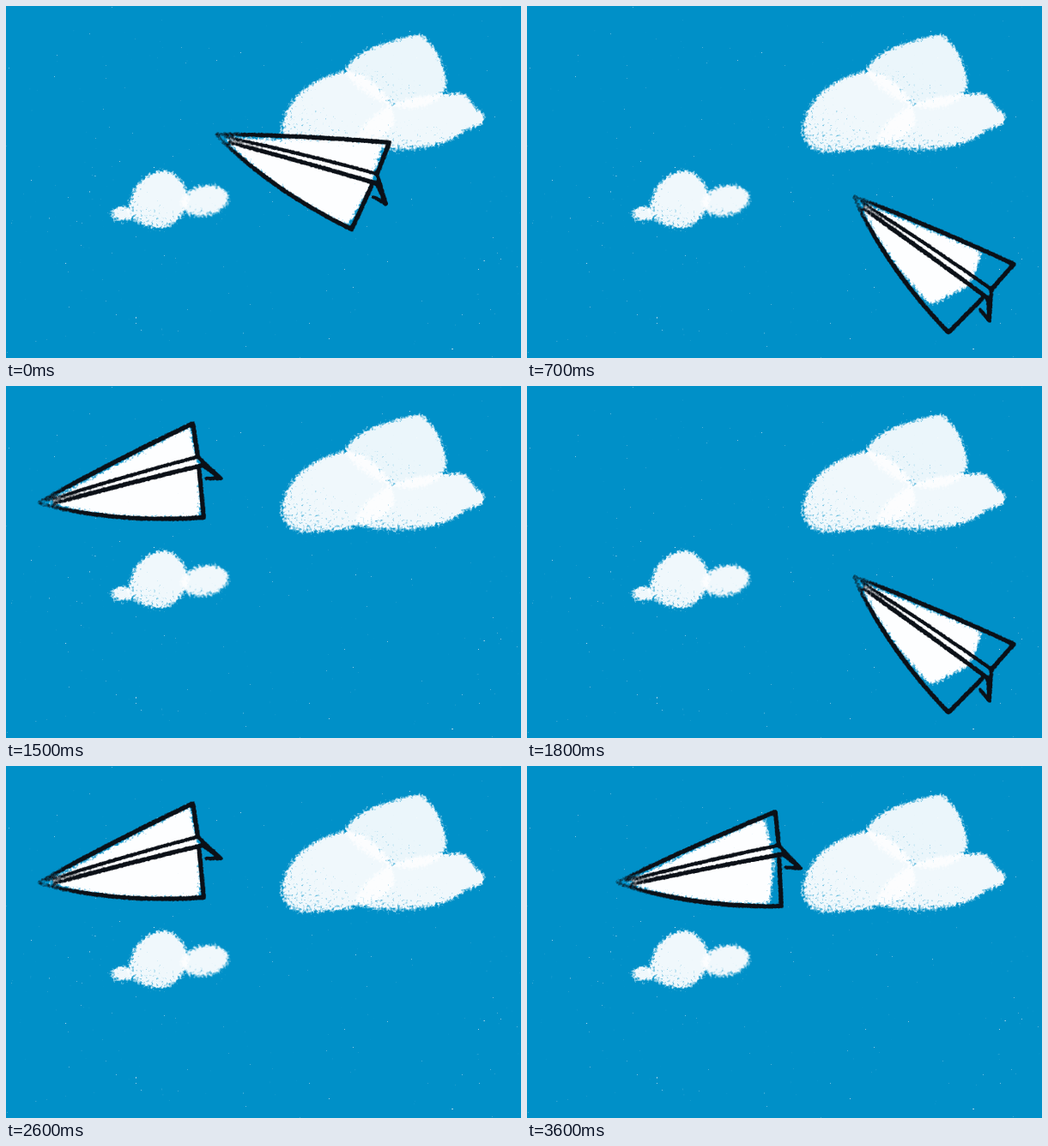
An HTML page that plays this animation: 600x411 px, repeating every 3700 ms.

```html
<!DOCTYPE html>
<html lang="en">
<head>
<meta charset="utf-8">
<title>Paper plane</title>
<style>
  html, body { margin: 0; width: 100%; height: 100%; overflow: hidden; background: #0090c8; }
  svg { display: block; width: 100%; height: 100%; }
  .lobe { fill: url(#thin); filter: url(#chalk); opacity: .95; }
  .back { opacity: .93; }
  .ink { fill: none; stroke: url(#fade); stroke-width: 4.8; stroke-linecap: round; stroke-linejoin: round; }
  .fine { stroke-width: 3.8; }
</style>
</head>
<body>
<svg viewBox="0 0 600 411">
  <defs>
    <!-- Grainy strokes: a blurred shape cut off by noise -->
    <filter id="chalk" filterUnits="userSpaceOnUse" x="0" y="0" width="600" height="411" color-interpolation-filters="sRGB">
      <feTurbulence type="fractalNoise" baseFrequency=".32" numOctaves="2" seed="4"/>
      <feColorMatrix values="0 0 0 0 0  0 0 0 0 0  0 0 0 0 0  1 0 0 0 0" result="grain"/>
      <feGaussianBlur in="SourceAlpha" stdDeviation="3.6"/>
      <feComposite in2="grain" operator="arithmetic" k2="2.6" k3="2.4" k4="-2" result="mask"/>
      <feFlood flood-color="#fdfeff"/>
      <feComposite in2="mask" operator="in"/>
    </filter>
    <filter id="crayon" filterUnits="userSpaceOnUse" x="0" y="0" width="600" height="411" color-interpolation-filters="sRGB">
      <feTurbulence type="fractalNoise" baseFrequency=".35" numOctaves="2" seed="9"/>
      <feColorMatrix values="0 0 0 0 0  0 0 0 0 0  0 0 0 0 0  1 0 0 0 0" result="grain"/>
      <feGaussianBlur in="SourceAlpha" stdDeviation="1"/>
      <feComposite in2="grain" operator="arithmetic" k2="2.4" k3="1.2" k4="-1.15" result="mask"/>
      <feFlood flood-color="#0b1017"/>
      <feComposite in2="mask" operator="in"/>
    </filter>
    <linearGradient id="thin" x1=".1" y1="1" x2=".5" y2=".3">
      <stop offset="0" stop-opacity=".66"/>
      <stop offset="1"/>
    </linearGradient>
    <linearGradient id="fade" gradientUnits="userSpaceOnUse" x1="-4" y1="0" x2="60" y2="0">
      <stop offset="0" stop-opacity=".35"/>
      <stop offset=".6" stop-opacity=".85"/>
      <stop offset="1"/>
    </linearGradient>
  </defs>

  <path class="lobe back" d="M392 76C405 52 445 40 484 33C500 48 513 68 513 95C505 125 440 140 392 76Z"/>
  <path class="lobe" d="M404 160C425 110 480 103 530 102C542 104 540 118 556 124C562 138 548 142 537 143C515 172 425 176 404 160Z"/>
  <path class="lobe" d="M320 143C324 105 365 80 398 76C435 84 455 115 452 140C430 168 370 174 338 171Q320 165 320 143Z"/>
  <ellipse class="lobe" cx="135" cy="243" rx="14" ry="9"/>
  <ellipse class="lobe" cx="231" cy="228" rx="29" ry="18" transform="rotate(-12 231 228)"/>
  <path class="lobe" d="M141 240C145 205 170 192 184 192C207 197 214 218 212 230C205 252 190 260 177 261C160 258 144 252 141 240Z"/>

  <g filter="url(#chalk)"><path id="paper" class="plane"/></g>
  <!-- The nose is the origin and the fold runs along x -->
  <g filter="url(#crayon)">
    <g class="plane">
      <path class="ink" d="M-3 0Q98 -23 195 -39L190 0"/>
      <path class="ink" d="M-2 2Q78 49 177 70L187 16"/>
      <path class="ink fine" d="M8 1Q100 -2 190 0L209 32L192 11"/>
      <path class="ink" d="M14 6Q100 7 192 11"/>
      <path class="ink fine" d="M209 32L192 27"/>
    </g>
  </g>
</svg>
<script>
// step, nose x, nose y, angle, reach of the white; the flight repeats every 11 steps
const keys = [
  [0, 384, 224, 34.2, .8],
  [4, 248, 150, 14, .97],
  [7, 108, 135, -12.9, .93],
  [8, 41, 135, -16, .98],
  [10, 9, 120, -17, .98]
];
const cycle = 11, first = 4;
const paper = document.getElementById('paper');
const planes = document.querySelectorAll('.plane');

function poseAt(step) {
  const i = Math.max(1, keys.findIndex(k => k[0] >= step));
  const a = keys[i - 1], b = keys[i];
  const t = ((step - a[0]) / (b[0] - a[0])) ** 1.15;
  return a.map((v, k) => v + (b[k] - v) * t).slice(1);
}

function draw(frame) {
  const [x, y, angle, reach] = poseAt((frame + first) % cycle);
  const front = 190 * (1 + 2 * reach) / 3;
  paper.setAttribute('d',
    `M6 2L${195 * reach} ${-38 * reach}L${front} 0V14L${177 * reach} ${69 * reach}Q${78 * reach} ${49 * reach} 6 2Z`);
  for (const p of planes) p.setAttribute('transform', `translate(${x} ${y}) rotate(${angle})`);
}

const start = performance.now();
let shown = -1;
function tick() {
  const frame = Math.floor((performance.now() - start) % 3700 / 100);
  if (frame !== shown) draw(shown = frame);
  requestAnimationFrame(tick);
}
tick();
</script>
</body>
</html>
```
